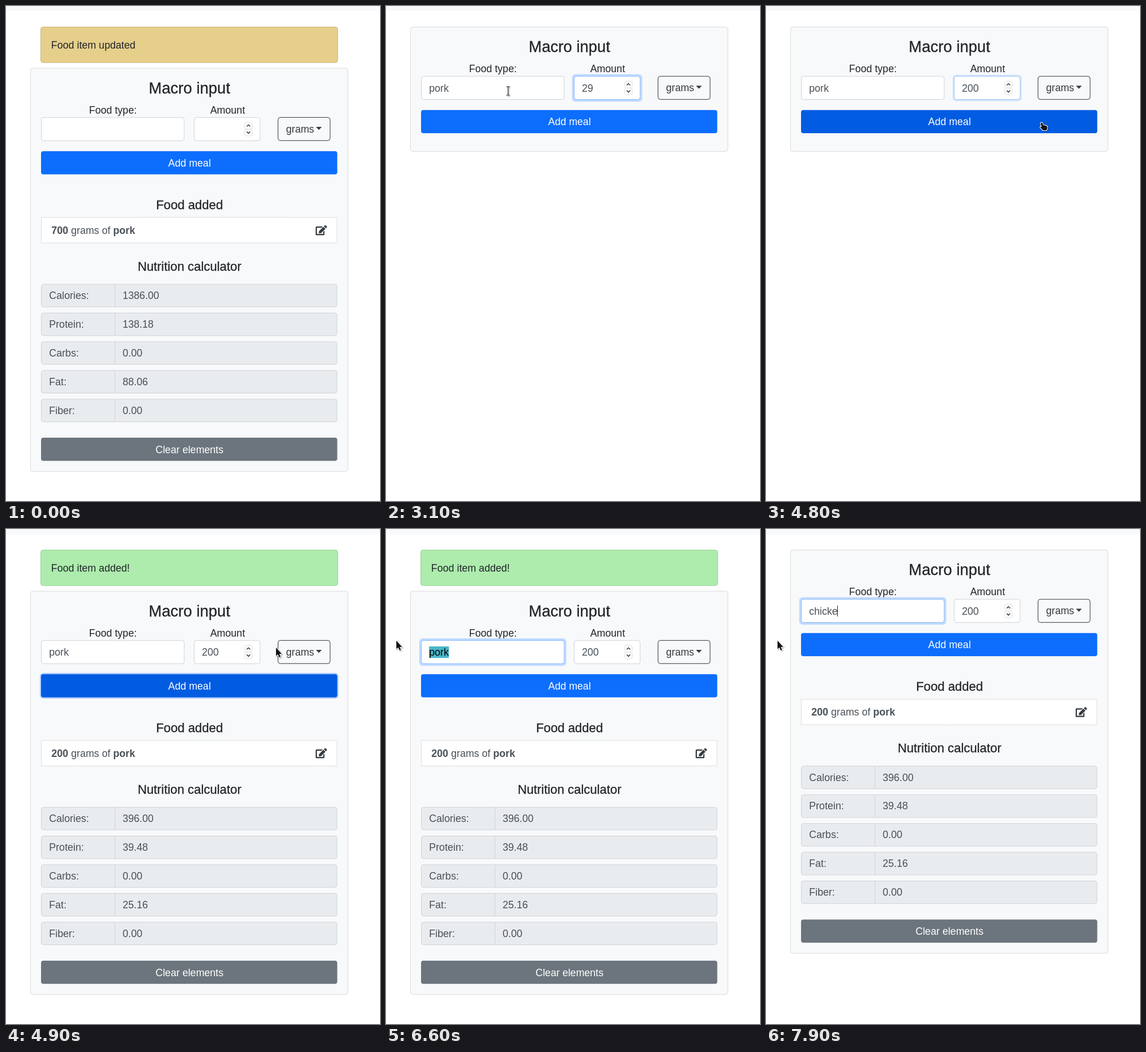
Recreate the animation shown at these times as an HTML page with a canvas. Size 651 by 860 pixels, loop 8000 ms.

```html
<!DOCTYPE html>
<html lang="en">
<head>
<meta charset="utf-8">
<title>Macro input</title>
<style>
  html, body { margin: 0; width: 100%; height: 100%; overflow: hidden; background: #fff; }
  canvas { display: block; }
</style>
</head>
<body>
<canvas id="stage" width="651" height="860"></canvas>
<script>
const ctx = document.getElementById('stage').getContext('2d');
const LOOP = 8000, FRAME = 100, BANNER_SHIFT = 71.5;
const LEFT = 61, WIDTH = 515.6, MIDDLE = 319.4;
const INK = '#212529', FIELD_INK = '#495057', LINE = '#ced4da', PANEL = '#f8f9fa';

// Each list holds [start time, value] pairs
const foodSteps = [[0, ''], [1100, 'p'], [1300, 'po'], [1400, 'por'], [1500, 'pork'],
  [7100, 'c'], [7200, 'ch'], [7500, 'chi'], [7700, 'chic'], [7800, 'chick'], [7900, 'chicke']];
const amountSteps = [[0, ''], [2200, '2'], [2600, '29'], [3200, '2'], [3400, '20'], [3600, '200']];
const bannerSteps = [[0, ['Food item updated', '#e6cf8b', '#cdb878']], [100, null],
  [4900, ['Food item added!', '#adecad', '#98d298']], [6900, null]];
const gramSteps = [[0, 700], [100, 0], [4900, 200]];
const nutrients = [['Calories:', 1.98], ['Protein:', .1974], ['Carbs:', 0], ['Fat:', .1258], ['Fiber:', 0]];

// [time, x, y]
const pointerPath = [[100, 212, 147], [3900, 212, 147], [4100, 300, 172], [4300, 480, 173],
  [4450, 578, 180], [4600, 560, 223], [4800, 477, 202], [4900, 470, 206], [5300, 410, 262],
  [5600, 331, 321], [5700, 290, 300], [5900, 190, 222], [6000, 165, 216], [6100, 160, 216],
  [6300, 90, 212], [6500, 1, 202], [6600, 18, 194], [6900, 18, 194], [7000, 20, 194]];

const arrowShape = new Path2D('M0 0V14.5L3.2 11.8 5.8 17 8 16 5.7 11H10Z');
const beamShape = new Path2D('M-3-7.5H-1L0-6.5 1-7.5H3M-3 7.5H-1L0 6.5 1 7.5H3M0-6.5V6.5');
const handShape = new Path2D('M1 2Q2-.5 4 1L5.5 5 10.5 6Q12.5 6.5 12.5 9V11L11 14H5L.5 9Q0 7 3 8Z');
const editShape = new Path2D('M396 78 498 180 274 406 160 416 170 302ZM418 54 461 11Q488-10 516 11L565 60Q585 86 565 115L522 158Z' +
  'M384 338 448 274V464Q446 510 400 512H48Q2 510 0 464V112Q2 66 48 64H362L298 128H64V448H384Z');

let shift = 0;

const last = (steps, t) => steps.filter(s => s[0] <= t).pop();
const current = (steps, t) => last(steps, t)[1];
const clamp = v => Math.max(0, Math.min(1, v));
// Strength of a state entered at `on` and left at `off`, with a 150 ms transition
const state = (t, on, off = Infinity) => clamp((t - on) / 150) - clamp((t - off) / 150);
const mix = (a, b, k) => `rgb(${a.map((v, i) => Math.round(v + (b[i] - v) * k))})`;

function box(x, y, w, h, fill, line, r = 4) {
  const inset = line ? .5 : 0;
  ctx.beginPath();
  ctx.roundRect(x + inset, y + shift + inset, w - 2 * inset, h - 2 * inset, r);
  ctx.fillStyle = fill;
  ctx.fill();
  if (!line) return;
  ctx.strokeStyle = line;
  ctx.lineWidth = 1;
  ctx.stroke();
}

function ring(x, y, w, h, color, k) {
  if (!k) return;
  ctx.globalAlpha = k;
  const d = 3.2 * k;
  box(x - d, y - d, w + 2 * d, h + 2 * d, color, null, 6);
  ctx.globalAlpha = 1;
}

function text(str, x, y, { size = 17.6, color = INK, align = 'left', bold = '' } = {}) {
  ctx.font = `${bold} ${size}px "Liberation Sans", Arial, sans-serif`;
  ctx.textAlign = align;
  ctx.fillStyle = color;
  ctx.fillText(str, x, Math.round(y + shift));
  return x + ctx.measureText(str).width;
}

// Headings are slightly heavier than body text
function heading(str, y, size) {
  text(str, MIDDLE, y, { size, align: 'center' });
  ctx.strokeStyle = INK;
  ctx.lineWidth = .3;
  ctx.strokeText(str, MIDDLE, Math.round(y + shift));
}

function field(x, w, value, focus, caret) {
  ring(x, 121.6, w, 41.4, '#bfdbff', focus);
  box(x, 121.6, w, 41.4, '#fff', mix([206, 212, 218], [134, 183, 254], focus));
  const end = text(value, x + 14, 148.9, { color: FIELD_INK });
  if (caret) {
    ctx.fillStyle = INK;
    ctx.fillRect(Math.floor(end), 133 + shift, 1, 19);
  }
}

function spinner() {
  for (const [top, tip] of [[130, -1], [142, 1]]) {
    box(415, top, 14, 12.8, '#fff', '#dcdfe2', 3);
    const y = top + shift + 6.3;
    ctx.beginPath();
    ctx.moveTo(419, y - tip * 1.5);
    ctx.lineTo(422, y + tip * 1.5);
    ctx.lineTo(425, y - tip * 1.5);
    ctx.strokeStyle = INK;
    ctx.lineWidth = 1.3;
    ctx.stroke();
  }
}

function unitMenu() {
  box(473, 121.6, 91.6, 41.2, PANEL, '#343a40');
  text('grams', 487.5, 148.3, { color: '#343a40' });
  const y = 138.6 + shift;
  ctx.beginPath();
  ctx.moveTo(539.5, y);
  ctx.lineTo(549.7, y);
  ctx.lineTo(544.6, y + 5.2);
  ctx.fill();
}

function results(grams) {
  const color = FIELD_INK;
  heading('Food added', 281.4, 21.8);
  box(LEFT, 295.4, WIDTH, 45.2, '#fff', '#dfdfdf', 0);
  let x = text(grams, 79, 324.4, { color, bold: 'bold' });
  x = text(' grams of ', x, 324.4, { color });
  text('pork', x, 324.4, { color, bold: 'bold' });

  ctx.save();
  ctx.translate(539, 309.3 + shift);
  ctx.scale(.0342, .0342);
  ctx.fillStyle = '#343a40';
  ctx.fill(editShape);
  ctx.restore();

  heading('Nutrition calculator', 388, 21.8);
  nutrients.forEach(([label, rate], i) => {
    const y = 411.4 + i * 49.9;
    box(LEFT, y, 129, 40.4, '#e9ecef', LINE, [4, 0, 0, 4]);
    box(189, y, LEFT + WIDTH - 189, 40.4, '#e9ecef', LINE, [0, 4, 4, 0]);
    text(label, 75, y + 26.2, { color });
    text((rate * grams).toFixed(2), 203, y + 26.2, { color });
  });
  box(LEFT, 678.4, WIDTH, 40.4, '#6c757d');
  text('Clear elements', MIDDLE, 705.3, { color: '#fff', align: 'center' });
}

function pointer(t) {
  if (t < pointerPath[0][0]) return;
  const a = last(pointerPath, t);
  const b = pointerPath[pointerPath.indexOf(a) + 1] || a;
  const k = a === b ? 0 : (t - a[0]) / (b[0] - a[0]);
  const x = Math.round(a[1] + (b[1] - a[1]) * k), y = Math.round(a[2] + (b[2] - a[2]) * k);
  const py = y - shift;
  const overButton = x > 61 && x < 577 && py > 181 && py < 221;
  const overField = py > 121 && py < 163 && (x > 61 && x < 311 || x > 327 && x < 415);

  ctx.save();
  ctx.translate(x, y);
  ctx.lineJoin = 'round';
  ctx.shadowColor = 'rgba(0,0,0,.35)';
  ctx.shadowBlur = 2;
  ctx.shadowOffsetX = ctx.shadowOffsetY = 1;
  ctx.strokeStyle = '#fff';
  if (overField) {
    ctx.translate(.5, .5);
    ctx.lineWidth = 2.5;
    ctx.stroke(beamShape);
    ctx.shadowColor = 'transparent';
    ctx.strokeStyle = '#222';
    ctx.lineWidth = 1.2;
    ctx.stroke(beamShape);
  } else {
    const shape = overButton ? handShape : arrowShape;
    ctx.lineWidth = 2;
    ctx.stroke(shape);
    ctx.shadowColor = 'transparent';
    ctx.fillStyle = '#111';
    ctx.fill(shape);
  }
  ctx.restore();
}

function selection(t) {
  const from = 109 - 34 * clamp((t - 6150) / 200);
  ctx.save();
  ctx.beginPath();
  ctx.rect(from, 204, 109.5 - from, 20);
  ctx.clip();
  ctx.fillStyle = '#48b7ca';
  ctx.fillRect(75, 204, 35, 20);
  text('pork', 75, 148.9, { color: '#000' });
  ctx.restore();
}

function draw(t) {
  const banner = current(bannerSteps, t), grams = current(gramSteps, t);
  const foodFocus = state(t, 250, 1850) + state(t, 6000);
  const amountFocus = state(t, 1850, 4750);
  const selecting = t >= 6200 && t < 7100;
  const blinkOn = steps => {
    const [since, value] = last(steps, t);
    return value && (t - since) % 1000 < 500;
  };

  shift = 0;
  ctx.fillStyle = '#fff';
  ctx.fillRect(0, 0, 651, 860);
  ctx.fillStyle = PANEL;
  ctx.fillRect(0, 0, 651, 9);
  if (banner) {
    box(60, 36, 517.8, 62.8, banner[1], banner[2]);
    text(banner[0], 78.5, 74);
    shift = BANNER_SHIFT;
  }

  box(42.2, 36, 553.4, grams ? 701.6 : 217, PANEL, '#d9dadb');
  heading('Macro input', 80.4, 27.1);
  text('Food type:', 186, 115, { align: 'center' });
  text('Amount', 385.7, 115, { align: 'center' });
  field(LEFT, 249.6, current(foodSteps, t), foodFocus,
    (t < 1850 || t > 6000) && !selecting && blinkOn(foodSteps));
  if (selecting) selection(t);
  field(327, 115.8, current(amountSteps, t), amountFocus, t > 1850 && t < 4750 && blinkOn(amountSteps));
  spinner();
  unitMenu();

  ring(LEFT, 180.7, WIDTH, 40.4, '#8fbcfc', state(t, 4800, 6000));
  box(LEFT, 180.7, WIDTH, 40.4, mix([13, 110, 253], [2, 92, 226], state(t, 4600, 6000)));
  text('Add meal', MIDDLE, 207.3, { color: '#fff', align: 'center' });

  if (grams) results(grams);
  pointer(t);
}

function tick(now) {
  draw(Math.floor(now % LOOP / FRAME) * FRAME);
  requestAnimationFrame(tick);
}
requestAnimationFrame(tick);
</script>
</body>
</html>
```
